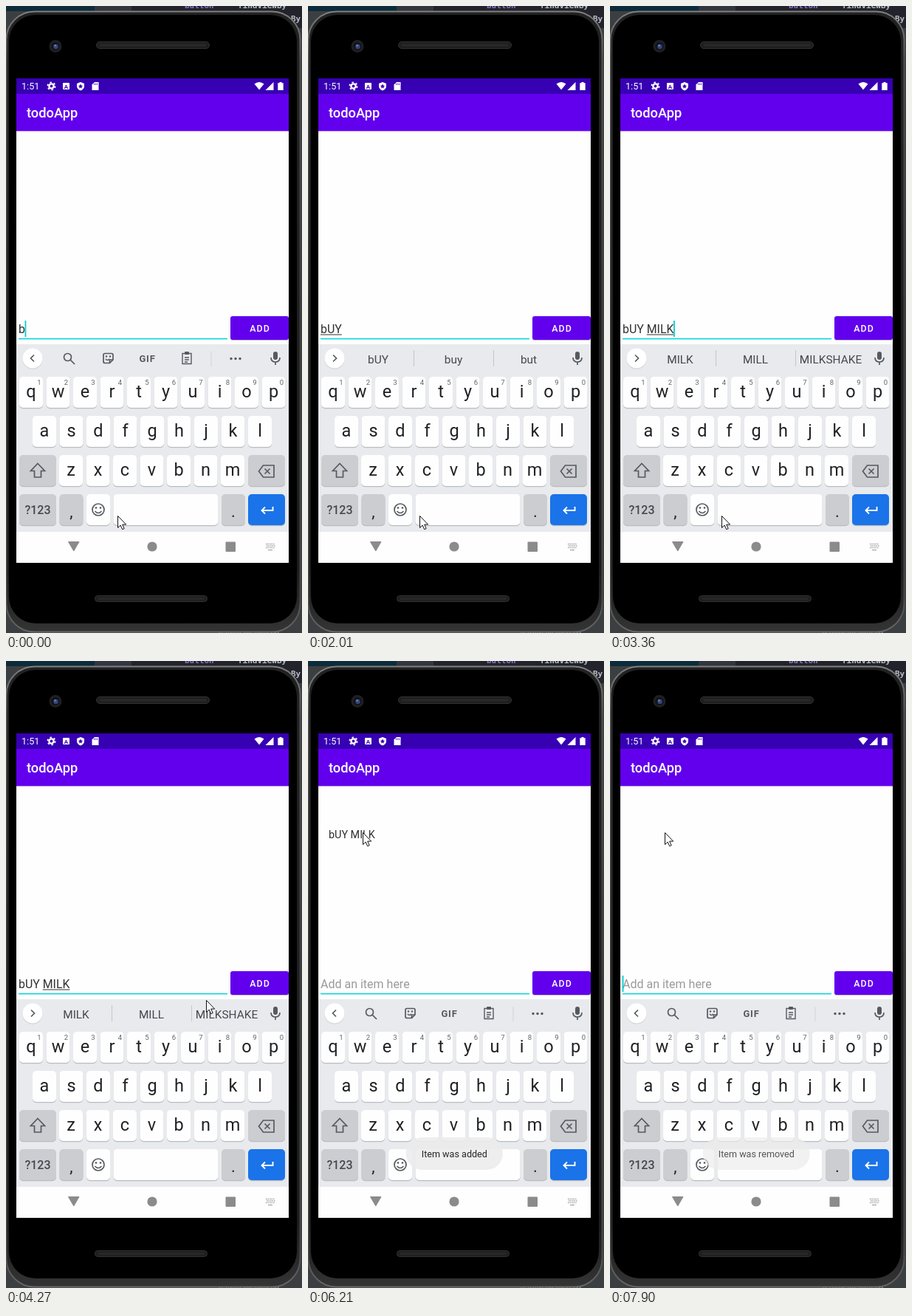
Animation, 401 px wide and 849 px high, one loop 8000 ms. Source, as an HTML page:

```html
<!DOCTYPE html>
<html lang="en">
<head>
<meta charset="utf-8">
<title>todoApp</title>
<style>
html, body { margin: 0; width: 100%; height: 100%; overflow: hidden; background: #3c3f41; }
svg { display: block; width: 100%; height: 100%; }
text { font-family: Roboto, sans-serif; white-space: pre; }
.mid { text-anchor: middle; }
.mono { font-family: "DejaVu Sans Mono", monospace; font-weight: bold; }
.line { fill: none; stroke: #565a5f; stroke-width: 1.7; }
</style>
</head>
<body>
<svg id="stage" viewBox="0 0 401 849" preserveAspectRatio="none"></svg>
<script>
const LOOP = 8000;
const stage = document.getElementById('stage');

const rect = (x, y, w, h, fill, r = 0, extra = '') =>
  `<rect x="${x}" y="${y}" width="${w}" height="${h}" rx="${r}" fill="${fill}" ${extra}/>`;
const circle = (x, y, r, fill, extra = '') =>
  `<circle cx="${x}" cy="${y}" r="${r}" fill="${fill}" ${extra}/>`;
const path = (d, extra = 'class="line"') => `<path d="${d}" ${extra}/>`;
const label = (x, y, size, fill, str, extra = '') =>
  `<text x="${x}" y="${y}" font-size="${size}" fill="${fill}" ${extra}>${str}</text>`;
const at = (x, y, body) => `<g transform="translate(${x} ${y})">${body}</g>`;

function desktop() {
  return rect(0, 0, 401, 849, '#3c3f41') + rect(0, 0, 120, 7, '#0d2c3b') +
    rect(120, 0, 50, 7, '#33353f') + rect(170, 0, 231, 30, '#23242b') +
    label(242, 3, 11, '#8c74c8', 'button', 'class="mono"') +
    label(314, 3, 11, '#b9bcc6', 'findViewBy', 'class="mono"') +
    label(386, 21, 11, '#b9bcc6', 'By', 'class="mono"') +
    label(288, 850, 11, '#a0a2a8', 'a total all files ca');
}

function phone() {
  return `<defs><linearGradient id="edge" x1="0" y1="0" x2="0" y2="1">
      <stop offset="0" stop-color="#808080"/><stop offset=".08" stop-color="#505050"/>
      <stop offset=".5" stop-color="#3c3c3c"/><stop offset=".94" stop-color="#484848"/>
      <stop offset="1" stop-color="#686868"/></linearGradient>
    <linearGradient id="bezel" x1="0" y1="0" x2="0" y2="1">
      <stop offset="0" stop-color="#222"/><stop offset=".9" stop-color="#1c1c1c"/>
      <stop offset="1" stop-color="#343434"/></linearGradient></defs>` +
    rect(.5, 7.5, 398, 840, 'url(#bezel)', 38, 'stroke="url(#edge)" stroke-width="2"') +
    rect(4, 12, 390, 824, '#000', 36) +
    circle(67, 54.5, 8.5, '#202022') + circle(67, 54.5, 5.5, '#11131d') +
    circle(67.5, 55, 3.2, '#33477c') + circle(66.5, 53.5, 1.2, '#7888b8') +
    rect(122.5, 48.5, 153, 9, '#1d1d1d', 4.5, 'stroke="#333"') +
    rect(126, 51, 146, 4, '#272727', 2) +
    rect(120.5, 798.5, 152, 8, '#1d1d1d', 4, 'stroke="#333"') +
    rect(124, 800.5, 145, 4, '#272727', 2);
}

function statusBar() {
  return rect(14, 98, 369, 21.5, '#3700b3') + label(21, 113, 12.6, '#fff', '1:51') +
    circle(61.5, 108.5, 3.1, 'none', 'stroke="#fff" stroke-width="2.4"') +
    circle(61.5, 108.5, 5.1, 'none', 'stroke="#fff" stroke-width="1.8" stroke-dasharray="2.4 2.94"') +
    rect(77, 104, 9, 9, '#fff', 1) + label(81.5, 111.5, 8, '#3700b3', 'A', 'class="mid" font-weight="700"') +
    path('M101 103l5 2v3.5q0 4-5 6q-5-2-5-6V105z', 'fill="#fff"') +
    path('M101 105.6l1 2 2 .3-1.5 1.5.4 2.1-1.9-1-1.9 1 .4-2.1-1.5-1.5 2-.3z', 'fill="#3700b3"') +
    path('M120 103h5.5v11h-9v-7.5z', 'fill="#fff"') +
    path('M119.5 104.5v2.5m2-2.5v2.5m2-2.5v2.5', 'stroke="#3700b3" stroke-width=".8"') +
    path('M336.5 105.5q6.5-5 13 0l-6.5 8z', 'fill="#fff"') +
    path('M362.5 103v11h-11z', 'fill="#fff"') +
    path('M370.5 103h3v1.3h2.2v9.7h-7.4v-9.7h2.2z', 'fill="#fff"');
}

function key(x, y, w, fill) {
  return rect(x, y + 1.2, w, 42, '#b9bcc0', 5) + rect(x, y, w, 42, fill, 5);
}

function letterRow(letters, firstX, y, hints) {
  return [...letters].map((c, i) => {
    const x = firstX + i * 36.5;
    return key(x - 16, y, 32, '#fefefe') +
      label(x, y + 28, 23.5, '#202124', c, 'class="mid"') +
      (hints ? label(x + 11, y + 11, 9.5, '#5f6368', (i + 1) % 10, 'class="mid"') : '');
  }).join('');
}

function keyboard() {
  const grey = '#cbcdd1';
  return rect(14, 458, 369, 254, '#e8eaed') +
    letterRow('qwertyuiop', 34, 502, true) +
    letterRow('asdfghjkl', 52, 555) +
    letterRow('zxcvbnm', 88, 608) +
    key(18, 608, 50, grey) + key(328, 608, 50, grey) +
    path('M43 619.5l9.5 10h-5v8.5h-9v-8.5h-5z') +
    path('M348.5 622h14.5v16h-14.5l-6-8zM350.5 626.5l7 7m0-7l-7 7') +
    key(18, 661, 50, grey) + label(43, 688, 16, '#45484d', '?123', 'class="mid" font-weight="500"') +
    key(72.5, 661, 32, grey) + label(88.5, 692, 22, '#202124', ',', 'class="mid"') +
    key(109, 661, 32, '#fefefe') + circle(125, 682, 8, 'none', 'class="line"') +
    circle(122, 679.5, 1.3, '#50545a') + circle(128, 679.5, 1.3, '#50545a') +
    path('M120.5 684q4.5 5 9 0') +
    key(145.5, 661, 142, '#fefefe') +
    key(292, 661, 32, grey) + label(308, 692, 22, '#202124', '.', 'class="mid"') +
    key(328, 661, 50, '#1a73e8') +
    path('M361.5 678v5h-15m4.5-4.5l-4.5 4.5 4.5 4.5', 'fill="none" stroke="#fff" stroke-width="1.9"');
}

function keyboardTop() {
  const ink = '#565a5f';
  const tools = at(85, 477,
      circle(-1.5, -1.5, 5, 'none', 'class="line"') + path('M2 2l6 6')) +
    at(138.5, 477, path('M-4.5-6.5h9q2 0 2 2v6.5l-4.5 4.5h-6.5q-2 0-2-2v-9q0-2 2-2zM2 6.5V2h4.5M-3.5 1q2.5 3 5 0') +
      circle(-2.5, -2.5, 1.2, ink) + circle(2.5, -2.5, 1.2, ink)) +
    label(191.5, 481.5, 13, ink, 'GIF', 'class="mid" font-weight="700" letter-spacing=".8"') +
    at(245, 477, path('M-6-6.5h12v14h-12zM-3 -1h6m-6 3h6m-6 3h4', 'class="line" style="stroke-width:1.4"') +
      rect(-3, -9, 6, 4, ink, 1)) +
    rect(277.5, 468, 1, 20, '#cfd5d8') +
    [305, 311, 317].map(x => circle(x, 477.5, 1.7, ink)).join('');
  const words = [143, 251].map(x => rect(x, 466, 1, 22, '#c3c6ca')).join('') +
    [95, 197, 299].map(x => label(x, 483.5, 15.4, '#45484d', '', 'class="mid suggestion"')).join('');
  return circle(36, 478, 13.7, '#d3d5d8') + circle(36, 477, 13.5, '#fff') +
    `<g id="tools">${tools}${path('M38 472.5l-4.5 4.5 4.5 4.5')}</g>` +
    `<g id="words">${words}${path('M34 472.5l4.5 4.5-4.5 4.5')}</g>` +
    rect(362, 468, 6, 11, ink, 3) + path('M359 476q0 6 6 6t6-6M365 482v4');
}

function navBar() {
  const dots = [0, 1, 2].map(r =>
    path(`M${352 + r % 2} ${728.5 + r * 2.5}h12`, 'stroke="#a4a4a4" stroke-width="1.3" stroke-dasharray="1.5 1"')).join('');
  return rect(14, 712, 369, 42, '#fefefe') +
    path('M84.5 725.5h14.5l-7.2 12.5z', 'fill="#8b8b8b" stroke="#8b8b8b" stroke-linejoin="round"') +
    circle(198, 732, 6.6, '#8b8b8b') + rect(297.5, 725.5, 13.5, 13.5, '#8b8b8b', 1) +
    dots + rect(355, 736, 6, 1.2, '#a4a4a4');
}

stage.innerHTML = desktop() + phone() + rect(14, 98, 369, 656, '#fefefe') + statusBar() +
  rect(14, 119, 369, 50.4, '#6200ee') + label(28, 151, 18.3, '#fff', 'todoApp', 'font-weight="500"') +
  label(28, 239.5, 14.4, '#303030', 'bUY MILK', 'id="item"') +
  label(17, 443, 15.9, '#303030', '', 'id="field"') +
  label(17, 443, 16, '#9a9a9a', 'Add an item here', 'id="hint"') +
  rect(17, 444.5, 0, 1, '#303030', 0, 'id="underline"') +
  rect(17, 449.8, 283, 1.6, '#05d5dc') + rect(17, 426, 1.8, 22, '#05d0cf', 0, 'id="caret"') +
  rect(304, 421, 79, 32, '#c9c5d2', 3) + rect(304, 420, 79, 32, '#6200ee', 3, 'id="button"') +
  label(344, 440.8, 12.4, '#fff', 'ADD', 'class="mid" font-weight="500" letter-spacing="1.1"') +
  keyboard() + keyboardTop() + navBar() +
  `<g id="toast">${rect(0, 645, 0, 44, '#ececec', 22, 'id="toastBox" fill-opacity=".88"')}${
    label(198.3, 672, 12.6, '#262626', '', 'id="toastText" class="mid"')}</g>` +
  `<g id="pointer">${path('M.5.5v16l3.7-3.4 2.5 5.6 2.5-1.1-2.5-5.5h5z',
    'fill="#fff" stroke="#111" stroke-width="1"')}</g>`;

const el = id => document.getElementById(id);
const show = (id, on) => el(id).setAttribute('visibility', on ? 'visible' : 'hidden');
const set = (id, name, value) => el(id).setAttribute(name, value);
const suggestionSlots = document.querySelectorAll('.suggestion');

// Each step: start time, then the values held until the next step.
const typing = [ // text, index where the underline ends
  [0, 'b', 0], [250, 'b', 1], [1020, 'bU', 1], [1330, 'bUY', 2], [1610, 'bUY', 3],
  [2290, 'bUY ', 0], [2410, 'bUY M', 0], [2720, 'bUY MI', 5], [2840, 'bUY MIL', 6],
  [3090, 'bUY MILK', 7], [3360, 'bUY MILK', 8], [4780, '', 0]
];
const suggestions = [
  [0, ''], [250, 'b buy but'], [1330, 'bU buy but'], [1610, 'bUY buy but'],
  [2410, 'a the my'], [2720, 'M MY ME'], [2840, 'MI MILK MIND'],
  [3090, 'MIL MILK MILL'], [3360, 'MILK MILL MILKSHAKE'], [4900, '']
];
const caretSteps = [
  [0, 1], [650, 0], [1020, 1], [2010, 0], [2290, 1], [3880, 0], [4420, 1],
  [5260, 0], [5820, 1], [6210, 0], [6710, 1], [7250, 0], [7750, 1]
];
const pointerSteps = [
  [0, 151, 690], [3610, 157, 693], [3760, 207, 698], [3880, 277, 657], [4030, 262, 568],
  [4150, 257, 490], [4270, 271, 459], [4420, 312, 440], [4540, 339, 428], [5140, 316, 427],
  [5260, 310, 425], [5410, 165, 278], [5560, 108, 262], [5680, 85, 248], [5820, 78, 236], [5950, 74, 232]
];
const buttonSteps = [[0, '#6200ee'], [4660, '#7a2cf0'], [5020, '#6d14ef'], [5140, '#6200ee']];
const toastSteps = [
  [0, 0], [4900, .4], [5020, .7], [5140, .9], [5260, 1], [6710, .85], [6830, .6],
  [6980, .3], [7130, .1], [7250, 0], [7750, .35], [7900, .78]
];
const hold = (steps, t) => steps.findLast(step => step[0] <= t).slice(1);

function draw(t) {
  const [text, end] = hold(typing, t);
  const field = el('field');
  field.textContent = text;
  const widthTo = n => n ? field.getSubStringLength(0, n) : 0;
  const wordStart = widthTo(text.lastIndexOf(' ') + 1);
  set('underline', 'x', 17 + wordStart);
  set('underline', 'width', end ? widthTo(end) - wordStart : 0);
  set('caret', 'x', 16.6 + widthTo(text.length));
  show('caret', hold(caretSteps, t)[0]);
  show('hint', !text);
  show('item', t >= 4780 && t < 7750);

  const [words] = hold(suggestions, t);
  show('tools', !words);
  show('words', words);
  suggestionSlots.forEach((slot, i) => slot.textContent = words.split(' ')[i] || '');

  set('button', 'fill', hold(buttonSteps, t)[0]);
  set('pointer', 'transform', `translate(${hold(pointerSteps, t).join(' ')})`);

  const toastText = el('toastText');
  toastText.textContent = t < 7500 ? 'Item was added' : 'Item was removed';
  const toastWidth = toastText.getComputedTextLength() + 42;
  set('toastBox', 'x', 198.3 - toastWidth / 2);
  set('toastBox', 'width', toastWidth);
  set('toast', 'opacity', hold(toastSteps, t)[0]);
}

const start = performance.now();
function frame() {
  draw((performance.now() - start) % LOOP);
  requestAnimationFrame(frame);
}
frame();
</script>
</body>
</html>
```
